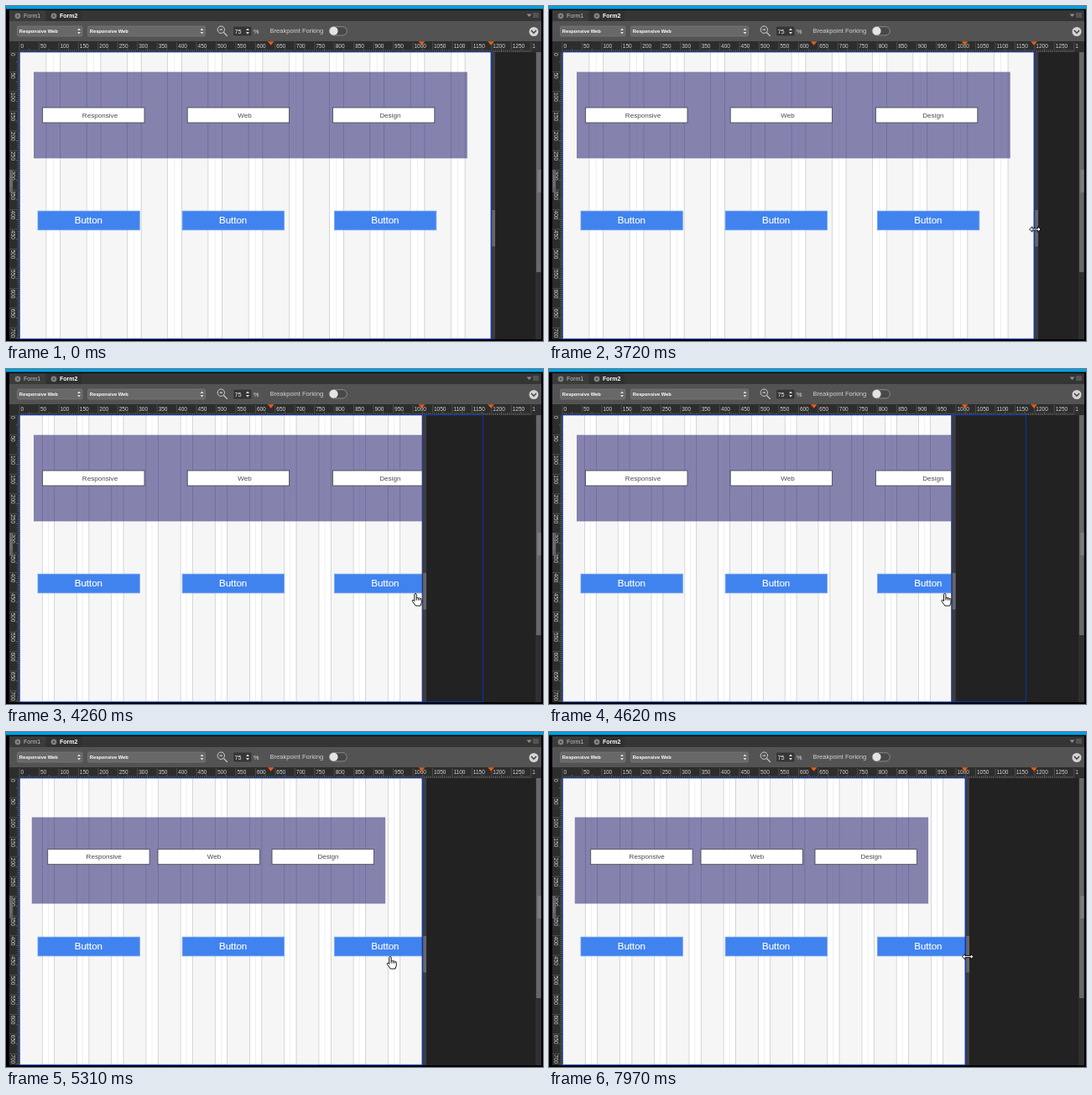
An HTML page that plays this animation: 640 by 399 pixels, repeating every 8 s.

```html
<!DOCTYPE html>
<html lang="en">
<head>
<meta charset="utf-8">
<title>Responsive form editor</title>
<style>
html, body { margin: 0; width: 100%; height: 100%; overflow: hidden; background: #000; }
svg { display: block; width: 100vw; height: 100vh; }
text { font-family: "Liberation Sans", Arial, sans-serif; }
.num { font-size: 6.5px; fill: #d2d2d2; }
.field { font-size: 8.1px; fill: #484848; text-anchor: middle; }
.btn { font-size: 11.5px; fill: #fff; stroke: #fff; stroke-width: .15; text-anchor: middle; }
</style>
</head>
<body>
<svg id="stage" viewBox="0 0 640 399">
  <defs>
    <clipPath id="pageClip"><rect id="pageBox" x="16" y="55" width="562" height="342"/></clipPath>
    <clipPath id="headClip"><rect id="headBox"/></clipPath>
    <clipPath id="topClip"><rect x="4" y="42" width="628" height="13"/></clipPath>
    <clipPath id="sideClip"><rect x="4" y="55" width="12" height="342"/></clipPath>
  </defs>
  <rect width="640" height="399" fill="#000"/>
  <rect x="4" y="5" width="634" height="392" fill="#222"/>
  <g id="ui"></g>
  <g clip-path="url(#pageClip)">
    <rect x="16" y="55" width="562" height="341.5" fill="#fff"/>
    <path id="cols" fill="#f6f6f6"/>
    <path id="mids" fill="#eaeaea"/>
    <path id="edges" fill="#c9c9c9"/>
    <rect id="head" fill="#8583ad" stroke="#7976a6" stroke-width=".8"/>
    <g clip-path="url(#headClip)">
      <path id="headMids" fill="#7f7cab"/>
      <path id="headEdges" fill="#6a66a1"/>
    </g>
    <g id="fields"></g>
    <g id="buttons"></g>
  </g>
  <g id="side">
    <rect y="55" width="5" height="341.5" fill="#3c3c40"/>
    <rect x="-.4" y="55" width="1.2" height="341.5" fill="#26378c"/>
    <rect x="1.8" y="243.5" width="2.6" height="42.5" fill="#66666a" stroke="#808084" stroke-width=".5"/>
  </g>
  <rect id="frame" x="16.4" y="54.8" height="341.6" fill="none" stroke="#0638c8" stroke-width="1.1" opacity=".8"/>
  <g id="cursor" fill="#fff" stroke="#000" stroke-width=".9" stroke-linejoin="round">
    <path id="arrow" d="M0 0V10.6L2.5 8.3L4.2 12L6 11.2L4.4 7.6H7.6Z"/>
    <path id="resize" d="M-6.8 0L-3.3-3.2V-1H3.3V-3.2L6.8 0L3.3 3.2V1H-3.3V3.2Z"/>
    <path id="hand" d="M-1.2 1.2a1.2 1.2 0 0 1 2.4 0V5.2q1.2-.8 2.2.2q1.3-.6 2 .5q1.6-.4 1.9 1V10.5L6 14.5H.2L-3.6 9.2q-.7-1.4.6-1.6q.9 0 1.8 1.4zM1.2 5.2V8M3.4 5.6V8M5.4 6V8"/>
  </g>
</svg>
<script>
const SCALE = 0.469, LEFT = 16, TOP = 55, LOOP = 8000;
const $ = id => document.getElementById(id);

function add(parent, tag, attrs, text) {
  const el = document.createElementNS("http://www.w3.org/2000/svg", tag);
  for (const k in attrs) el.setAttribute(k, attrs[k]);
  if (text !== undefined) el.textContent = text;
  return parent.appendChild(el);
}
function set(el, attrs) {
  for (const k in attrs) el.setAttribute(k, attrs[k]);
}
const ui = $("ui");
const box = (x, y, width, height, fill, more) => add(ui, "rect", { x, y, width, height, fill, ...more });
const label = (x, y, size, fill, str, more) => add(ui, "text", { x, y, "font-size": size, fill, ...more }, str);
const shape = (d, fill, more) => add(ui, "path", { d, fill, ...more });
const spin = (x, y) => shape(`M${x - 2} ${y - 1}l2-2.6l2 2.6zM${x - 2} ${y + 1}l2 2.6l2-2.6z`, "#e0e0e0");

function drawTabs() {
  box(0, 0, 640, 3.6, "#00a2e2");
  box(4, 5, 634, 13, "#353535");
  box(4, 5, 43, 13, "#3b3b3b");
  box(48, 5, 42, 13, "#303030");
  for (const x of [14, 57]) {
    add(ui, "circle", { cx: x, cy: 11.8, r: 3.4, fill: "#858585" });
    shape(`M${x - 1.3} 10.5l2.6 2.6m0-2.6l-2.6 2.6`, "none", { stroke: "#333", "stroke-width": .8 });
  }
  label(21, 13.7, 7, "#c4c4c4", "Form1");
  label(64, 13.7, 7, "#fff", "Form2", { "font-weight": "bold" });
  shape("M620.5 9.5h6l-3 3.6z", "#909090");
  shape("M628 9h7m-7 2h7m-7 2h7", "none", { stroke: "#808080", "stroke-width": .8 });
}

function drawToolbar() {
  box(4, 18, 634, 24, "#535353");
  const frame = { rx: 1.5, stroke: "#7a7a7a", "stroke-width": .7 };
  for (const [x, w] of [[13.5, 77.5], [97.5, 140]]) {
    box(x, 24, w, 12, "#686868", frame);
    label(x + 2.3, 32, 5.75, "#fff", "Responsive Web", { "font-weight": "bold" });
    spin(x + w - 4, 30);
  }
  add(ui, "circle", { cx: 256.3, cy: 28.2, r: 4.2, fill: "none", stroke: "#cfcfcf", "stroke-width": 1 });
  shape("M254.6 28.2h3.4M259.5 31.5l4.3 4.3", "none", { stroke: "#cfcfcf", "stroke-width": 1.2 });
  box(270.5, 24, 22.5, 12, "#363636", { ...frame, stroke: "#606060" });
  label(272.5, 32.7, 7.3, "#eee", "75");
  spin(288, 30);
  label(295, 32.7, 7.3, "#ddd", "%");
  label(314.5, 32.4, 7.6, "#d2d2d2", "Breakpoint Forking");
  box(385.3, 24.7, 21, 10.2, "#484848", { rx: 5.1, stroke: "#999", "stroke-width": .8 });
  add(ui, "circle", { cx: 390.6, cy: 29.8, r: 5, fill: "#e4e4e4" });
  add(ui, "circle", { cx: 629, cy: 30.5, r: 5.5, fill: "#d4d4d4" });
  shape("M626 29l3 3.2l3-3.2", "none", { stroke: "#444", "stroke-width": 1.6 });
}

function drawRulers() {
  box(4, 42, 634, 13, "#2d2d2d");
  box(4, 55, 12, 342, "#2d2d2d");
  const top = add(ui, "g", { "clip-path": "url(#topClip)" });
  const side = add(ui, "g", { "clip-path": "url(#sideClip)" });
  let major = "", minor = "", sideMajor = "", sideMinor = "";
  for (let v = 0; v <= 1300; v += 5) {
    const x = LEFT + v * SCALE, y = TOP + v * SCALE;
    if (v % 50) {
      const len = v % 25 ? 2.5 : 4;
      minor += `M${x} 55v${-len}`;
      sideMinor += `M16 ${y}h${-len}`;
      continue;
    }
    major += `M${x} 55v-12`;
    sideMajor += `M16 ${y}h-12`;
    add(top, "text", { x: x + 1.5, y: 50.3, class: "num" }, v);
    if (v < 750) add(side, "text", { transform: `translate(6 ${y + 1}) rotate(90)`, class: "num" }, v);
  }
  const ink = (g, d, stroke) => add(g, "path", { d, stroke, fill: "none", "stroke-width": .6 });
  ink(top, major, "#666");
  ink(top, minor, "#858585");
  ink(side, sideMajor, "#666");
  ink(side, sideMinor, "#858585");
  for (const x of [315.7, 495.5, 578]) shape(`M${x - 3.8} 42.3h7.6l-3.8 4.4z`, "#ef5a14");
  box(4, 195, 4.2, 27, "#626262");
  shape("M5.3 202v14M7 202v14", "none", { stroke: "#999", "stroke-width": .5, "stroke-dasharray": "1 1" });
  box(631, 42, 7, 355, "#2f2f2f");
  box(632, 55, 5.5, 262, "#686868");
  box(633.5, 195, 4, 27, "#7e7e7e");
}

const fields = ["Responsive", "Web", "Design"].map(str => ({
  rect: add($("fields"), "rect", { width: 121.4, height: 18, fill: "#fff", stroke: "#4a4a58", "stroke-width": .9 }),
  text: add($("fields"), "text", { class: "field" }, str)
}));

for (const x of [38, 210.2, 391.5]) {
  add($("buttons"), "rect", { x, y: 244.2, width: 121.3, height: 22.6, fill: "#4083ef", stroke: "#6c9ff0", "stroke-width": .8 });
  add($("buttons"), "text", { x: x + 60.4, y: 259.2, class: "btn" }, "Button");
}

const wide = { x: 33.4, y: 79, w: 515.8, fx: [43.6, 216.2, 389.4], fy: 121, shift: 68.4 };
const narrow = { x: 31.2, y: 102, w: 420.5, fx: [49.7, 181, 317], fy: 139.7, shift: 67 };

function showLayout(l) {
  const r = { x: l.x, y: l.y, width: l.w, height: 102 };
  set($("head"), r);
  set($("headBox"), r);
  fields.forEach((f, i) => {
    set(f.rect, { x: l.fx[i], y: l.fy });
    set(f.text, { x: l.fx[i] + l.shift, y: l.fy + 11.5 });
  });
}

// Twelve columns; each gutter is 3% of the page width.
function showGrid(w) {
  const gap = w * .03, pitch = (w + gap) / 12, col = pitch - gap;
  const strip = (x, width) => `M${x} 55h${width}v341.5h${-width}z`;
  let cols = "", mids = "", edges = "";
  for (let k = 0; k < 12; k++) {
    const x = LEFT + k * pitch;
    cols += strip(x, col);
    if (k) edges += strip(x + .1, .75);
    if (k < 11) {
      edges += strip(x + col + .15, .75);
      mids += strip(x + col + gap / 2, .75);
    }
  }
  set($("cols"), { d: cols });
  for (const id of ["mids", "headMids"]) set($(id), { d: mids });
  for (const id of ["edges", "headEdges"]) set($(id), { d: edges });
}

// Interpolates [time, value] keys.
function track(keys, t) {
  if (t <= keys[0][0]) return keys[0][1];
  for (let i = 1; i < keys.length; i++) {
    const [t0, a] = keys[i - 1], [t1, b] = keys[i];
    if (t < t1) return a + (b - a) * (t - t0) / (t1 - t0);
  }
  return keys[keys.length - 1][1];
}

const step = (t, from, to) => Math.min(to, from + Math.floor((t - from) / 60) * 60);

function edgeAt(t) {
  if (t < 3780) return 578;
  if (t >= 5190) return 496;
  const s = t < 4560 ? step(t, 3720, 4500) : step(t, 4570, 4990);
  return track([[3720, 578], [3840, 566], [4140, 508], [4260, 496], [4500, 482], [4990, 466]], s);
}

// The page outline lags behind the edge until the drag ends.
const frameAt = (t, edge) => t < 5190 ? Math.max(edge, 568) : edge;

function cursorAt(t, edge) {
  if (t < 1200) return ["none", 0, 0];
  if (t < 3720) {
    const p = (step(t, 1200, 1860) - 1200) / 660, e = 1 - (1 - p) ** 2;
    const x = 636 - 53.5 * e, y = 298 - 32.5 * e;
    return [p > .85 ? "resize" : "arrow", x, y];
  }
  if (t < 3840) return ["resize", edge + 1.3, 266];
  if (t < 5190) return ["hand", edge - 8, 267.5];
  if (t < 6840) return ["hand", 458, 267.5];
  if (t < 7590) {
    const p = (step(t, 6780, 7260) - 6780) / 480;
    const x = 458 + 47 * p;
    return [x < 494 ? "hand" : "arrow", x, 267.5 + 2 * Math.sin(Math.PI * p)];
  }
  if (t < 7970) {
    const x = track([[7530, 505], [7770, 501.7]], step(t, 7530, 7770));
    return [x > 503.5 ? "arrow" : "resize", x, 268];
  }
  return ["resize", 499.2, 267.6];
}

function render(t) {
  const edge = edgeAt(t);
  showGrid(edge - LEFT);
  showLayout(t < 5250 ? wide : narrow);
  set($("pageBox"), { width: edge - LEFT });
  set($("side"), { transform: `translate(${edge} 0)` });
  set($("frame"), { width: frameAt(t, edge) - LEFT });
  const [kind, x, y] = cursorAt(t, edge);
  for (const id of ["arrow", "resize", "hand"]) set($(id), { display: id === kind ? "inline" : "none" });
  set($("cursor"), { transform: `translate(${x} ${y})` });
}

drawTabs();
drawToolbar();
drawRulers();
const start = performance.now();
function tick() {
  render((performance.now() - start) % LOOP);
  requestAnimationFrame(tick);
}
tick();
</script>
</body>
</html>
```
